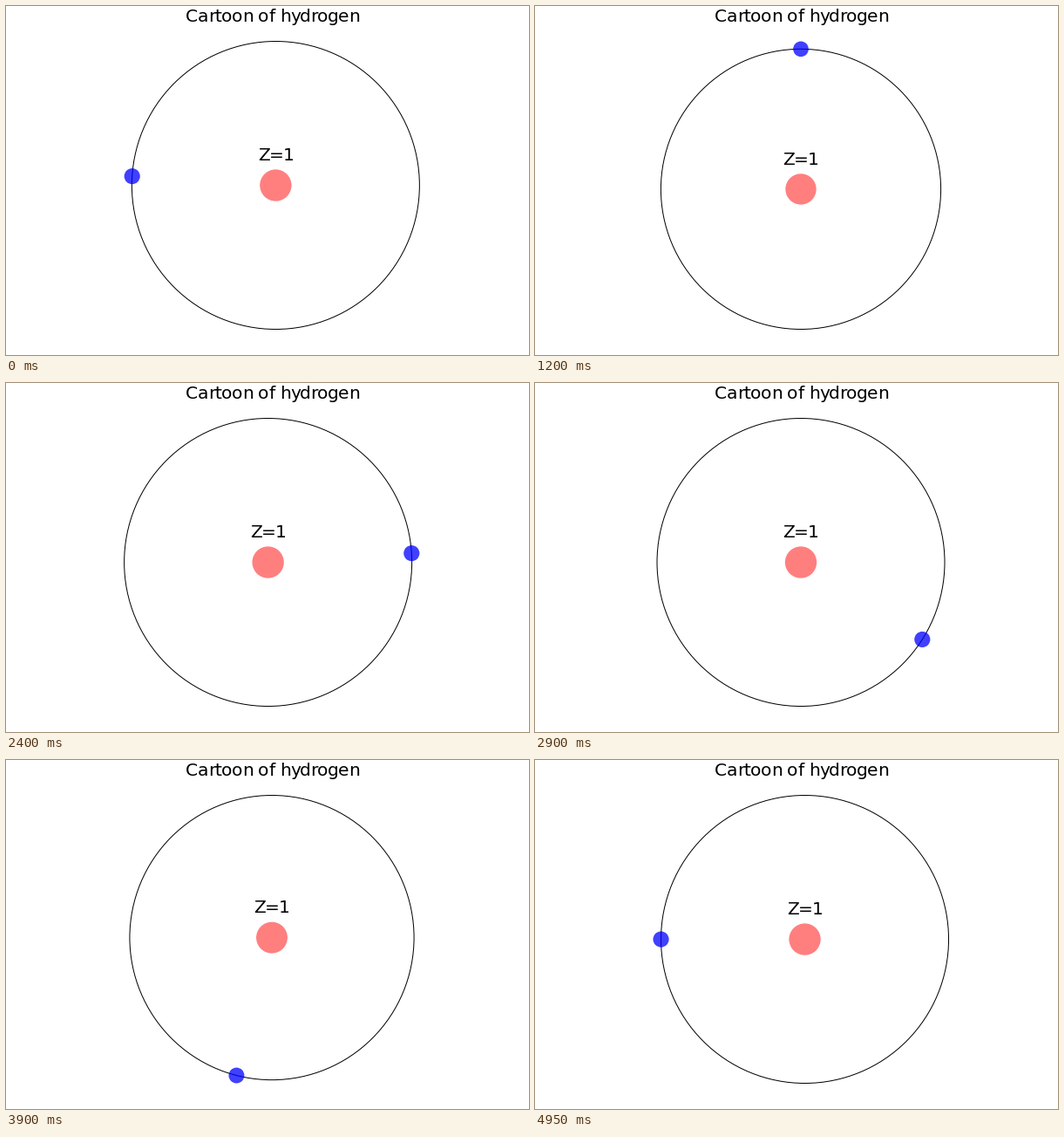
Recreate the animation shown at these times as a matplotlib script. Size 600 by 400 pixels, loop 5000 ms.

```python
import math

import matplotlib.pyplot as plt
from matplotlib.animation import FuncAnimation
from matplotlib.patches import Circle
from matplotlib.textpath import TextPath

WIDTH, HEIGHT, DPI = 600, 400, 100
FRAMES, INTERVAL = 100, 50

# Plot area in pixels, y pointing down
MID_X, TOP, BOTTOM = 305, 40.5, 370.5

# Sizes relative to the orbit radius
NUCLEUS, ELECTRON = 0.11, 0.055

FONT_PX = 20.25
PT = 72 / DPI

plt.rcParams["font.family"] = "DejaVu Sans"

fig = plt.figure(figsize=(WIDTH / DPI, HEIGHT / DPI), dpi=DPI, facecolor="white")
ax = fig.add_axes([0, 0, 1, 1])
ax.set_xlim(0, WIDTH)
ax.set_ylim(HEIGHT, 0)
ax.axis("off")


def advance(char):
    """Whole-pixel advance width of one character."""
    def right(text):
        return TextPath((0, 0), text, size=FONT_PX).get_extents().x1

    return math.floor(right(char + "I") - right("I"))


class Label:
    """Centred text set on whole-pixel advances."""

    def __init__(self, text):
        self.glyphs = []
        x = 0
        for char in text:
            if char != " ":
                glyph = ax.text(0, 0, char, fontsize=FONT_PX * PT, color="black",
                                ha="left", va="baseline", zorder=4)
                self.glyphs.append((glyph, x))
            x += advance(char)
        self.width = x

    def place(self, center, baseline):
        left = round(center - self.width / 2)
        for glyph, x in self.glyphs:
            glyph.set_position((left + x, baseline))


def disc(zorder, **style):
    return ax.add_patch(Circle((0, 0), 1, zorder=zorder, **style))


orbit = disc(1, fill=False, edgecolor="black", linewidth=PT)
nucleus = disc(2, facecolor="red", alpha=0.5, linewidth=0)
electron = disc(3, facecolor="blue", alpha=0.75, linewidth=0)

title = Label("Cartoon of hydrogen")
title.place(MID_X, 18)
charge = Label("Z=1")


def limits(pos):
    """Data range covering the orbit and the electron along one axis."""
    return min(-1, pos - ELECTRON), max(1, pos + ELECTRON)


def update(frame):
    angle = math.pi - 2 * math.pi * (frame + 1) / FRAMES
    ex, ey = math.cos(angle), math.sin(angle)

    # The view fits the vertical range and centres the horizontal one
    x_lo, x_hi = limits(ex)
    y_lo, y_hi = limits(ey)
    scale = (BOTTOM - TOP) / (y_hi - y_lo)
    cx = MID_X - scale * (x_lo + x_hi) / 2
    cy = BOTTOM + scale * y_lo

    orbit.set_center((cx, cy))
    orbit.set_radius(scale)
    nucleus.set_center((cx, cy))
    nucleus.set_radius(NUCLEUS * scale)
    electron.set_center((cx + scale * ex, cy - scale * ey))
    electron.set_radius(ELECTRON * scale)
    charge.place(cx, round(cy - 2 * NUCLEUS * scale + 7.5))
    return orbit, nucleus, electron


anim = FuncAnimation(fig, update, frames=FRAMES, interval=INTERVAL,
                     repeat=True, repeat_delay=0, blit=False)
plt.show()
```
